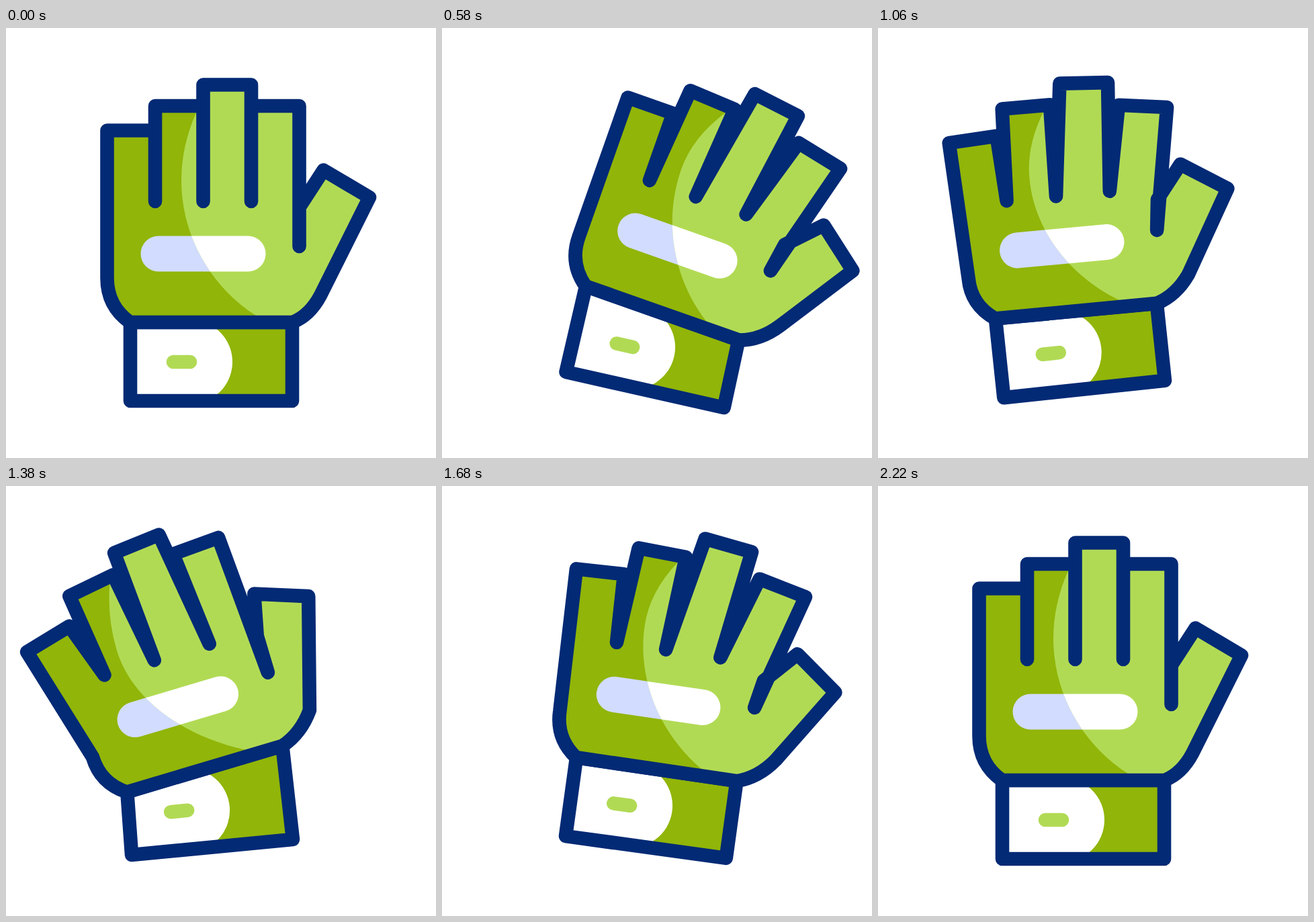
These frames come from a looping animation (640 by 640 pixels, 2400 ms). An HTML page:

```html
<!DOCTYPE html>
<html lang="en">
<head>
<meta charset="utf-8">
<title>Waving glove</title>
<style>
  html, body { margin: 0; width: 100%; height: 100%; overflow: hidden; background: #fff; }
  svg { display: block; width: 100%; height: 100%; }
  .line { fill: none; stroke: #032a75; stroke-width: 20.6; stroke-linejoin: round; }
  .pill { fill: none; stroke-width: 53; stroke-linecap: round; }
</style>
</head>
<body>
<svg viewBox="0 0 640 640">
  <defs><clipPath id="lit"><path id="light"/></clipPath></defs>
  <g id="glove">
    <path class="cuff" fill="#91b508"/>
    <path d="M-120-130H-31V-120.5A62.5 62.5 0 0 1-31 4.5H-120Z" fill="#fff"/>
    <path d="M-56.5-58H-31.5" stroke="#b1da54" stroke-width="20.6" stroke-linecap="round"/>
    <path class="cuff line"/>
    <g id="hand">
      <path class="skin" fill="#91b508"/>
      <path class="pill" stroke="#d2dcff"/>
      <g clip-path="url(#lit)">
        <path class="skin" fill="#b1da54"/>
        <path class="pill" stroke="#fff"/>
      </g>
      <path class="skin line"/>
    </g>
  </g>
</svg>
<script>
const LOOP = 2400;
const CUFF = { x: 305.5, y: 555, half: 120.5, height: 117 };

// Key poses as [time, value]: angles in degrees, spreads as a share of the full pose.
const tracks = {
  swing: [[200, 0], [580, 12.7], [670, 13.2], [900, 5.7], [1060, -6], [1200, -7.5],
          [1380, -5.5], [1680, 7.8], [1810, 10], [2220, 0]],
  bend: [[200, 0], [580, 6.7], [800, 9.3], [900, 7.5], [1060, .7], [1360, -11.2],
         [1680, .5], [1830, 2.5], [2220, 0]],
  right: [[200, 0], [580, .72], [800, 1.1], [900, 1], [1060, .53], [1360, 0],
          [1680, .8], [1830, .9], [2220, 0]],
  left: [[900, 0], [1060, .2], [1360, 1], [1680, .13], [1830, 0]],
  lift: [[200, 0], [580, 16.5], [900, 22], [1060, 17.5], [1680, 17.5], [2220, 0]],
  stretch: [[900, 1], [1060, .96], [1380, .98], [1680, .99], [2220, 1]]
};

// Monotone cubic interpolation, at rest at every turning point.
function sample(keys, t) {
  const last = keys.length - 1;
  if (t <= keys[0][0]) return keys[0][1];
  if (t >= keys[last][0]) return keys[last][1];
  const i = keys.findIndex(k => k[0] > t) - 1;
  const slope = j => (keys[j + 1][1] - keys[j][1]) / (keys[j + 1][0] - keys[j][0]);
  const tangent = j => {
    if (j === 0 || j === last) return 0;
    const a = slope(j - 1), b = slope(j);
    return a * b > 0 ? 2 * a * b / (a + b) : 0;
  };
  const span = keys[i + 1][0] - keys[i][0];
  const u = (t - keys[i][0]) / span, v = 1 - u;
  return v * v * (1 + 2 * u) * keys[i][1] + u * u * (3 - 2 * u) * keys[i + 1][1]
    + span * u * v * (v * tangent(i) - u * tangent(i + 1));
}

// Hand coordinates start at the middle of the wrist.
const PALM = [-12, -102];
const WEB = [131, -113];
const FINGER_WIDTH = 71.5;
const FINGER_LEFT = -155;
const fingers = [
  { top: -285.5, valley: -180, pushRight: 0, pushLeft: 20 },
  { top: -322, valley: -180, pushRight: 2, pushLeft: 14 },
  { top: -353.5, valley: -180, pushRight: 13, pushLeft: 0 },
  { top: -322, valley: WEB[1], pushRight: 0, pushLeft: 0 }
];

// Leans a point about a pivot along its tangent.
const lean = ([x, y], [cx, cy], amount) => [x - amount * (y - cy), y + amount * (x - cx)];

// The fan opens towards the index finger on the right, the little finger on the left.
const fan = (i, right, left) => .3 * right * (i / 3) ** 1.2 - .27 * left * .62 ** i;

function outline(right, left) {
  const points = [[-121, 0], [FINGER_LEFT, -24], [FINGER_LEFT, -66]];
  fingers.forEach((f, i) => {
    const x = FINGER_LEFT + FINGER_WIDTH * i, end = x + FINGER_WIDTH;
    const amount = fan(i, right, left);
    points.push(
      lean([x, f.top], PALM, amount),
      lean([end, f.top], PALM, amount),
      [end + f.pushRight * right - f.pushLeft * left, f.valley]);
  });
  const thumb = p => lean(lean(p, PALM, .18 * right), WEB, -.2 * left);
  const widen = 12 * (right + left);
  points.push(
    lean([131, -171], PALM, .14 * right), thumb([167, -226.5]), thumb([235.5, -186]),
    [162.5 + widen, -40], [146.5 + widen / 2, -10], [121, 0]);
  return points;
}

function shading(right, left) {
  const x = -44.5 - 31 * left;
  return [lean([-22.5, -312], PALM, fan(1, right, left)),
    [x, -262], [x, -211], [x, -131], [-2.5 - 11 * left, -54], [66.5, -10]];
}

const byId = id => document.getElementById(id);
const setPath = (selector, d) =>
  document.querySelectorAll(selector).forEach(node => node.setAttribute('d', d));

function draw(t) {
  const at = name => sample(tracks[name], t);
  const swing = at('swing'), bend = at('bend'), right = at('right'), left = at('left');
  const stretch = at('stretch');
  const text = points =>
    points.map(([x, y]) => `${x.toFixed(2)} ${(y * stretch).toFixed(2)}`).join(' ');

  byId('glove').setAttribute('transform',
    `translate(${CUFF.x - .27 * swing} ${CUFF.y - at('lift')}) rotate(${swing})`);
  byId('hand').setAttribute('transform', `translate(0 ${-CUFF.height}) rotate(${bend})`);

  // The top corners of the cuff follow the wrist line.
  const a = bend * Math.PI / 180;
  const wx = CUFF.half * Math.cos(a), wy = CUFF.half * Math.sin(a);
  setPath('.cuff', `M${-CUFF.half} 0L${-wx} ${-CUFF.height - wy}`
    + `L${wx} ${-CUFF.height + wy}L${CUFF.half} 0Z`);

  const skin = outline(right, left);
  const n = skin.length;
  setPath('.skin', `M${text(skin.slice(0, 1))}Q${text(skin.slice(1, 3))}`
    + `L${text(skin.slice(3, n - 2))}Q${text(skin.slice(n - 2))}Z`);
  setPath('.pill', `M${text([[-78.5, PALM[1]]])}L${text([[54.5, PALM[1]]])}`);

  const edge = shading(right, left);
  setPath('#light', `M${text(edge.slice(0, 1))}Q${text(edge.slice(1, 3))}`
    + `C${text(edge.slice(3))}l60 60H600V-800H${edge[0][0] + 20}Z`);
}

const start = performance.now();
function tick() {
  draw((performance.now() - start) % LOOP);
  requestAnimationFrame(tick);
}
tick();
</script>
</body>
</html>
```
